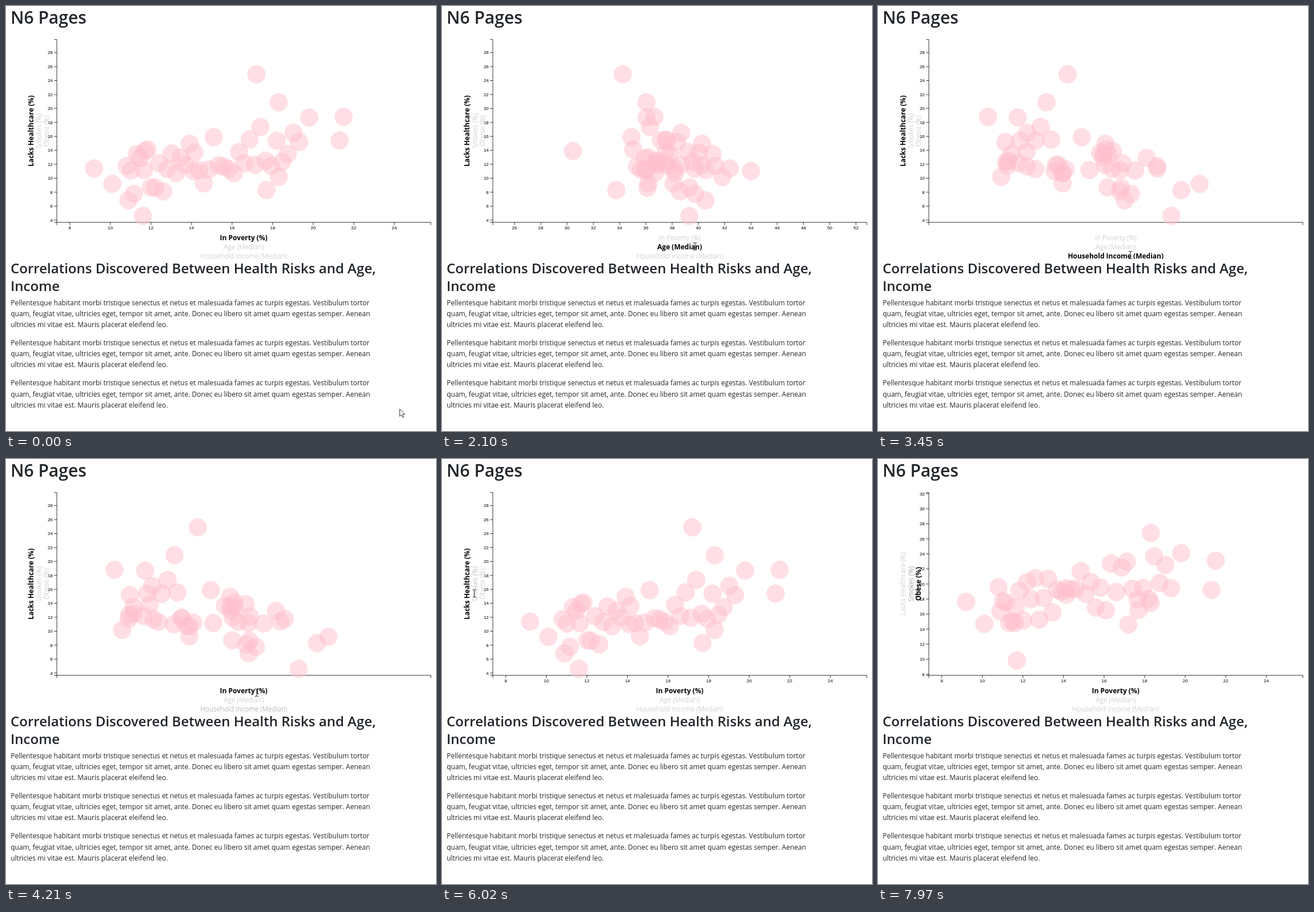
Write an HTML page that moves like this. It is 753 px wide and 744 px high and loops after 8000 ms.

```html
<!DOCTYPE html>
<html lang="en">
<head>
<meta charset="utf-8">
<title>Health risks scatter chart</title>
<style>
  html, body { margin: 0; width: 100%; height: 100%; overflow: hidden; background: #fff; }
  svg { display: block; font-family: "Open Sans", "Noto Sans", sans-serif; fill: #212529; }
  .title { font-size: 30px; font-weight: 600; }
  .heading { font-size: 24.05px; font-weight: 600; }
  .body { font-size: 12px; }
  .label { font-size: 12px; font-weight: 300; text-anchor: middle; }
  .bold { font-weight: 700; }
  .tick { font: 8px "Liberation Sans", Arial, sans-serif; fill: #000; }
  .line { stroke: #000; stroke-width: .8; fill: none; }
  .dot { fill: pink; opacity: .5; }
</style>
</head>
<body>
<svg width="753" height="744" viewBox="0 0 753 744">
  <clipPath id="chartBox"><rect x="9" y="43" width="744" height="400"/></clipPath>
  <text class="title" x="8" y="30.5">N6 Pages</text>
  <text class="heading" x="8" y="468">Correlations Discovered Between Health Risks and Age,</text>
  <text class="heading" x="8" y="498.5">Income</text>
  <g id="article" class="body"></g>
  <g id="chart" clip-path="url(#chartBox)"></g>
  <g id="cursor"></g>
</svg>
<script>
const LOOP = 8000, LEFT = 89, RIGHT = 744, TOP = 58.7, BOTTOM = 378.7;
const ALWAYS = 1e5;

let seed = 2014;
const random = () => (seed = seed * 16807 % 2147483647) / 2147483647;
const spread = size => (random() * 2 - 1) * size;

// The outlying states: poverty, age, income, healthcare, smokes
const outliers = [
  [9.2, 42.5, 66500, 11.4, 17.5],
  [21.5, 36.7, 39680, 18.8, 23],
  [11.7, 30.5, 60900, 13.9, 9.7],
  [14.1, 44.1, 49500, 11, 19.3],
  [10.1, 38.2, 73970, 9.2, 14.6],
  [11.6, 39.4, 69200, 4.6, 14.7],
  [17.2, 34.3, 53000, 24.9, 14.5],
  [18.3, 41.9, 41100, 10.2, 26.7],
  [18.3, 36.1, 49300, 20.9, 17.4],
  [17.7, 33.8, 71600, 8.3, 16.4],
  [21.3, 37.2, 44800, 15.4, 19.1],
  [19.8, 36.1, 44600, 18.7, 24]];

// The others follow the trend: poorer states earn less, smoke more and lack more care.
const typical = Array.from({ length: 39 }, (_, i) => {
  const u = i / 38, poverty = 10.8 + 8.5 * u ** 1.25;
  return [
    poverty,
    38 + spread(1.8) + spread(1.8),
    45000 + 19500 * (1 - u) ** 1.3 + spread(4500),
    12 + .55 * (poverty - 14.5) + spread(4),
    16.3 + 4.5 * u + spread(3.2)];
});

const states = [...outliers, ...typical];
const [poverty, age, income, healthcare, smokes] = [0, 1, 2, 3, 4].map(c => states.map(s => s[c]));
const obese = smokes.map(v => 21.3 + (v - 9.7) * 14.6 / 17);

function makeAxis(values, from, to, step = 2) {
  const low = Math.min(...values) * .8, high = Math.max(...values) * 1.2;
  const ticks = [];
  for (let v = Math.ceil(low / step) * step; v <= high; v += step) ticks.push(v);
  return { values, ticks, scale: v => from + (v - low) / (high - low) * (to - from) };
}
const povertyAxis = makeAxis(poverty, LEFT, RIGHT);
const xStages = [
  [-ALWAYS, povertyAxis],
  [1182, makeAxis(age, LEFT, RIGHT)],
  [2705, makeAxis(income, LEFT, RIGHT, 5000)],
  [4029, povertyAxis]];
const yStages = [
  [-ALWAYS, makeAxis(healthcare, BOTTOM, TOP)],
  [6406, makeAxis(smokes, BOTTOM, TOP)],
  [7830, makeAxis(obese, BOTTOM, TOP)]];

// bold: while selected; dark: while selected or hovered
const xLabels = [
  { text: "In Poverty (%)", bold: [[-ALWAYS, 1182], [4029, ALWAYS]], dark: [[-ALWAYS, 1182], [3640, ALWAYS]] },
  { text: "Age (Median)", bold: [[1182, 2705]], dark: [[790, 2705]] },
  { text: "Household Income (Median)", bold: [[2705, 4029]], dark: [[690, 780], [2350, 4029]] }];
const yLabels = [
  { text: "Lacks Healthcare (%)", bold: [[-ALWAYS, 6406]], dark: [[-ALWAYS, 6406]] },
  { text: "Smokes (%)", bold: [[6406, 7830]], dark: [[6000, 7830]] },
  { text: "Obese (%)", bold: [[7830, ALWAYS]], dark: [[7560, ALWAYS]] }];

// Pointer moves: start, end, x, y
const pointerMoves = [
  [-1, 0, 689, 705],
  [70, 850, 443, 421],
  [2190, 2580, 442, 436],
  [3540, 3740, 439, 409],
  [4330, 4850, 265, 375],
  [4870, 5160, 40, 309],
  [5300, 6080, 57, 234],
  [7410, 7730, 68, 235]];
const textPointer = [[560, 4400], [5900, LOOP]];

const clamp = v => Math.min(1, Math.max(0, v));
const mix = (a, b, f) => a + (b - a) * f;
const smooth = u => u * u * (3 - 2 * u);
const cubicInOut = u => u < .5 ? 4 * u ** 3 : 1 - 4 * (1 - u) ** 3;
const easeOut = u => 1 - (1 - u) ** 1.7;
const within = (spans, t) => spans.some(([on, off]) => t >= on && t < off);
const line = (d, opacity = 1) => `<path class="line" d="${d}" opacity="${opacity}"/>`;

function blend(stages, t) {
  const i = stages.findLastIndex(([start]) => t >= start);
  const [start, next] = stages[i];
  const prev = stages[Math.max(0, i - 1)][1];
  const f = cubicInOut(clamp((t - start) / 1000));
  return {
    place: k => mix(prev.scale(prev.values[k]), next.scale(next.values[k]), f),
    ticks: [...new Set([...prev.ticks, ...next.ticks])].map(v => ({
      text: v.toLocaleString("en"),
      at: mix(prev.scale(v), next.scale(v), f),
      opacity: !prev.ticks.includes(v) ? f : !next.ticks.includes(v) ? 1 - f : 1
    })).filter(tick => tick.opacity > 0 && tick.at > -50 && tick.at < 800)
  };
}

function drawLabel(label, t, place) {
  const dark = Math.max(...label.dark.map(([on, off]) =>
    easeOut(clamp((t - on) / 300)) * (1 - easeOut(clamp((t - off) / 300)))));
  const gray = Math.round(188 * (1 - dark));
  return `<text class="label ${within(label.bold, t) ? "bold" : ""}" ${place}
    fill="rgb(${gray},${gray},${gray})">${label.text}</text>`;
}

function drawChart(t) {
  const x = blend(xStages, t), y = blend(yStages, t);
  const xTicks = x.ticks.map(({ at, text, opacity }) => line(`M${at} ${BOTTOM}v4.8`, opacity) +
    `<text class="tick" text-anchor="middle" x="${at}" y="391.3" opacity="${opacity}">${text}</text>`);
  const yTicks = y.ticks.map(({ at, text, opacity }) => line(`M${LEFT} ${at}h-4.8`, opacity) +
    `<text class="tick" text-anchor="end" x="81.8" y="${at + 2.8}" opacity="${opacity}">${text}</text>`);
  const dots = states.map((_, k) => `<circle class="dot" r="16" cx="${x.place(k)}" cy="${y.place(k)}"/>`);
  return [
    ...xTicks, ...yTicks,
    line(`M${LEFT} ${BOTTOM + 4.8}V${BOTTOM}H${RIGHT}v4.8`),
    line(`M${LEFT - 4.8} ${BOTTOM}H${LEFT}V${TOP}h-4.8`),
    ...dots,
    ...xLabels.map((label, i) => drawLabel(label, t, `x="416.2" y="${410.2 + 16 * i}"`)),
    ...yLabels.map((label, i) => drawLabel(label, t, `transform="translate(${48 + 13.5 * i} 218.7) rotate(-90)"`))
  ].join("");
}

function drawCursor(t) {
  const i = pointerMoves.findLastIndex(([start]) => t >= start);
  const [start, end, toX, toY] = pointerMoves[i];
  const [, , fromX, fromY] = pointerMoves[Math.max(0, i - 1)];
  const f = smooth(clamp((t - start) / (end - start)));
  const shape = within(textPointer, t)
    ? `<path d="M-3-6.5h2.2l.8.8.8-.8H3M0-6V6M-3 6.5h2.2l.8-.8.8.8H3" fill="none" stroke="#222"/>`
    : `<path d="M.5.5v12.8l3-2.8 2 4.6 2-.9-2-4.4h4.1z" fill="#fff" stroke="#223" stroke-width=".9"/>`;
  return `<g transform="translate(${mix(fromX, toX, f)} ${mix(fromY, toY, f)})">${shape}</g>`;
}

const paragraph = [
  "Pellentesque habitant morbi tristique senectus et netus et malesuada fames ac turpis egestas. Vestibulum tortor",
  "quam, feugiat vitae, ultricies eget, tempor sit amet, ante. Donec eu libero sit amet quam egestas semper. Aenean",
  "ultricies mi vitae est. Mauris placerat eleifend leo."];
const byId = id => document.getElementById(id);
byId("article").innerHTML = [0, 1, 2].flatMap(p => paragraph.map((text, i) =>
  `<text x="8.2" y="${523.7 + 70.3 * p + 19.2 * i}">${text}</text>`)).join("");

function frame() {
  const t = performance.now() % LOOP;
  byId("chart").innerHTML = drawChart(t);
  byId("cursor").innerHTML = drawCursor(t);
  requestAnimationFrame(frame);
}
frame();
</script>
</body>
</html>
```
